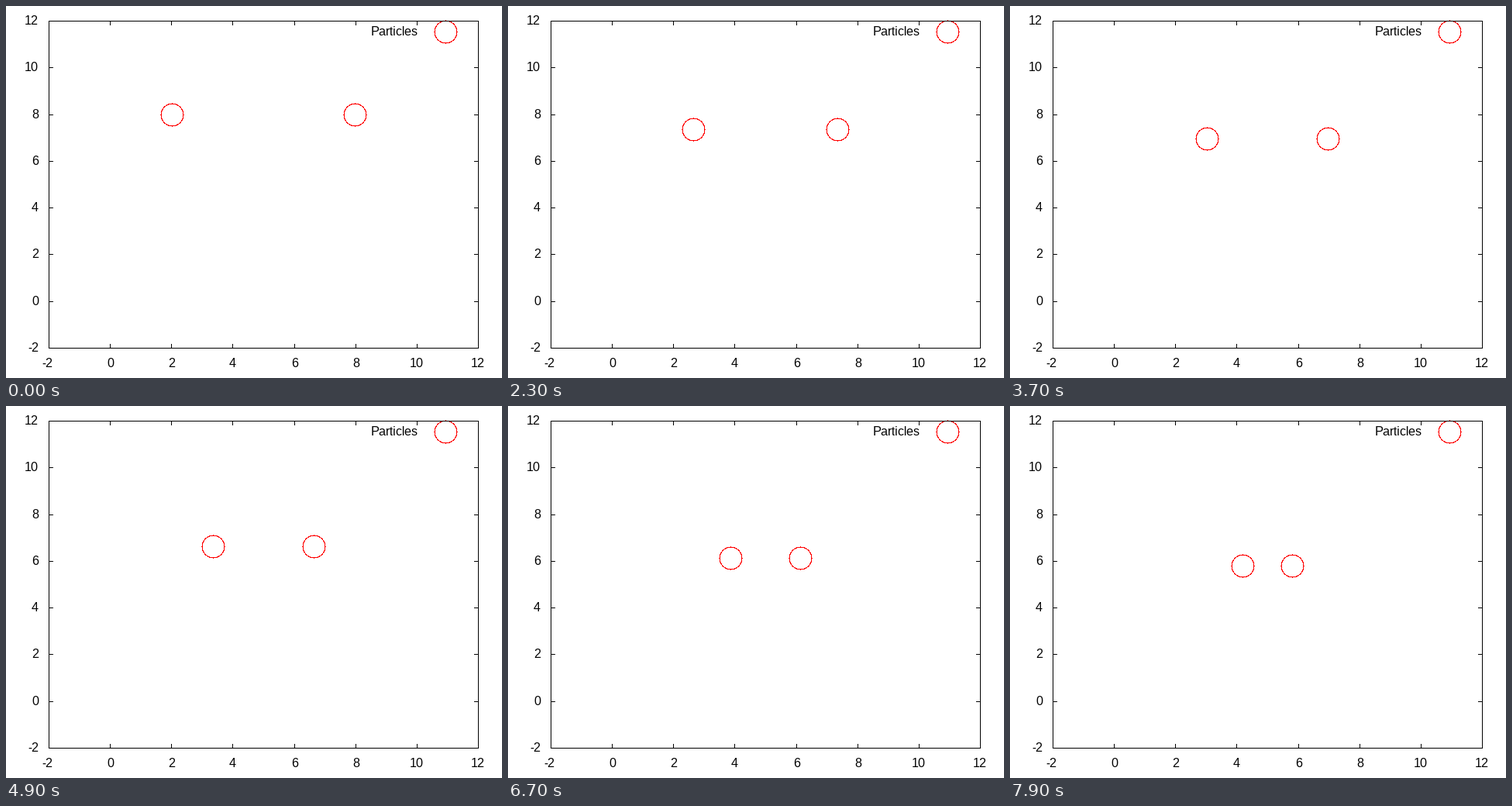
These frames come from a looping animation (640 px wide and 480 px high, 8000 ms). A matplotlib script:

```python
import math

import matplotlib.pyplot as plt
from matplotlib.animation import FuncAnimation
from matplotlib.patches import PathPatch, Rectangle
from matplotlib.path import Path
from matplotlib.transforms import Affine2D

plt.rcParams.update({
    "font.family": "Liberation Sans",
    "font.size": 11.52,  # 16 px at 100 dpi
    "text.hinting": "default",
    "text.hinting_factor": 1,
})

W, H, DPI = 640, 480, 100
FRAMES, INTERVAL = 80, 100
LEFT, RIGHT, TOP, BOTTOM = 55, 609, 19, 441
LO, HI = -2, 12
TIC = 5
RADIUS = 15
START, STEP = 0.0213, 0.0275  # data units

fig = plt.figure(figsize=(W / DPI, H / DPI), dpi=DPI, facecolor="white")
ax = fig.add_axes([0, 0, 1, 1])
ax.set_xlim(0, W)
ax.set_ylim(H, 0)
ax.axis("off")


def to_px(x, y):
    """Data point to whole pixels, rounded as on a raster plot."""
    px = LEFT + (x - LO) * (RIGHT - LEFT) / (HI - LO)
    py = BOTTOM - (y - LO) * (BOTTOM - TOP) / (HI - LO)
    return math.floor(px + 0.5), math.floor(py + 0.5)


def bar(x0, y0, x1, y1):
    """Black line covering the pixels from one end to the other."""
    ax.add_patch(Rectangle((x0, y0), x1 - x0 + 1, y1 - y0 + 1,
                           fc="black", lw=0, snap=False, zorder=3))


def label(x, y, s):
    ax.text(x, y, s, ha="left", va="baseline", color="black", zorder=4)


def text_width(s):
    return sum(5 if c == "-" else 9 for c in s)


def ring_path():
    """Stair-stepped circle: one unit square per pixel, cut towards zero."""
    angles = [math.radians(a) for a in range(360)]
    pixels = {(int(round(RADIUS * math.cos(a), 6)),
               int(round(RADIUS * math.sin(a), 6))) for a in angles}
    verts, codes = [], []
    for x, y in sorted(pixels):
        verts += [(x, y), (x + 1, y), (x + 1, y + 1), (x, y + 1), (x, y)]
        codes += [Path.MOVETO] + [Path.LINETO] * 3 + [Path.CLOSEPOLY]
    return Path(verts, codes)


RING = ring_path()


def place(ring, x, y):
    ring.set_transform(Affine2D().translate(x, y) + ax.transData)


def add_ring(x, y):
    ring = PathPatch(RING, fc="#ff0000", lw=0, snap=False, zorder=2)
    ax.add_patch(ring)
    place(ring, x, y)
    return ring


# Border
for y in (TOP, BOTTOM):
    bar(LEFT, y, RIGHT, y)
for x in (LEFT, RIGHT):
    bar(x, TOP, x, BOTTOM)

# Tics and their labels
for v in range(LO, HI + 1, 2):
    x, y = to_px(v, v)
    s = str(v)
    bar(x, TOP, x, TOP + TIC)
    bar(x, BOTTOM - TIC, x, BOTTOM)
    bar(LEFT, y, LEFT + TIC, y)
    bar(RIGHT - TIC, y, RIGHT, y)
    shift = 2 if v < 0 else 0
    label(x - text_width(s) // 2 - shift, 466, s)
    label(42 - text_width(s), y + 5, s)

# Key
label(471, 38, "Particles")
add_ring(567, 33)

particles = [add_ring(0, 0), add_ring(0, 0)]


def update(i):
    s = START + STEP * i
    place(particles[0], *to_px(2 + s, 8 - s))
    place(particles[1], *to_px(8 - s, 8 - s))
    return particles


anim = FuncAnimation(fig, update, frames=FRAMES, interval=INTERVAL,
                     repeat=True, repeat_delay=0, blit=False)
plt.show()
```
